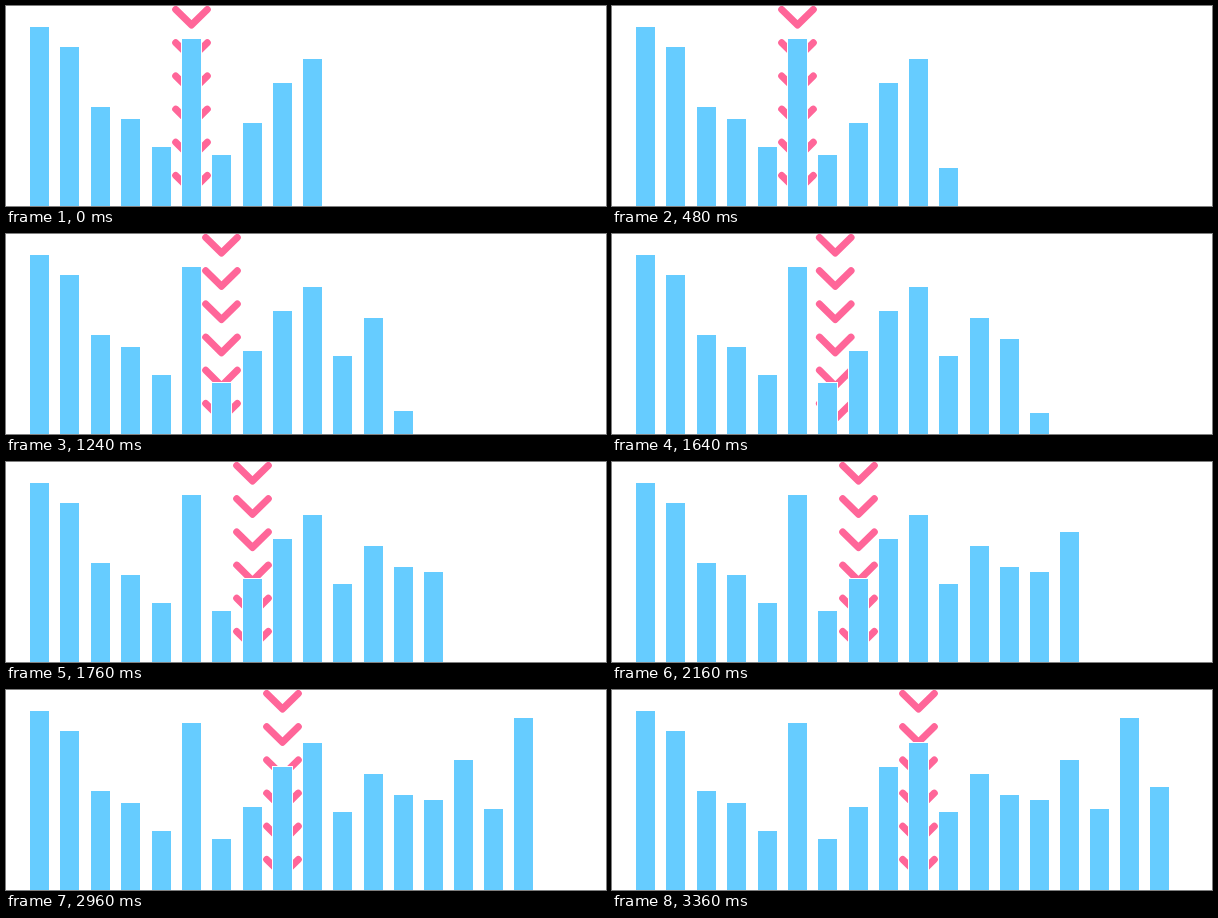
An HTML page with a canvas that plays this animation: 600x200 px, repeating every 3.84 s.

```html
<!DOCTYPE html>
<html lang="en">
<head>
<meta charset="utf-8">
<title>Bars and median marker</title>
<style>
  html, body { margin: 0; height: 100%; overflow: hidden; background: #fff; }
  canvas { display: block; }
</style>
</head>
<body>
<canvas width="600" height="200"></canvas>
<script>
const ctx = document.querySelector('canvas').getContext('2d');
const LOOP = 3840, TICK = 40, W = 600, H = 200, BAR = 19, FIRST = 10;
const values = [179, 159, 99, 87, 59, 167, 51, 83, 123, 147, 78, 116, 95, 90, 130, 81, 172, 103];

// Left edge of bar i; the spacing narrows slightly to the right.
const barX = i => 24 + Math.round(30.5 * i - 0.0155 * i * i);

// Linear progress in four held ticks, beginning at `start`.
const progress = (t, start) =>
  Math.max(0, Math.min(4, Math.floor((t - start) / TICK) + 1)) / 4;

function drawMarker(t) {
  let cx = barX(5) + BAR / 2;
  for (let j = 0; j < 4; j++) cx += (barX(j + 6) - barX(j + 5)) * progress(t, 840 + 800 * j);

  ctx.strokeStyle = '#ff6699';
  ctx.lineWidth = 7;
  ctx.lineCap = ctx.lineJoin = 'round';
  for (let y = 3.5; y < H; y += 33.2) {
    ctx.beginPath();
    ctx.moveTo(cx - 15.8, y);
    ctx.lineTo(cx, y + 15.6);
    ctx.lineTo(cx + 15.8, y);
    ctx.stroke();
  }
}

function drawBar(value, i, t) {
  const p = i < FIRST ? 1 : progress(t, 440 + 400 * (i - FIRST));
  if (!p) return;
  const x = barX(i), base = H + 2; // bars rise from just below the stage
  const y = Math.floor(base - (value + 2) * p);
  ctx.fillStyle = '#fff';
  ctx.fillRect(x - 1, y - 1, BAR + 2, H - y + 1);
  ctx.fillStyle = '#66ccff';
  ctx.fillRect(x, y, BAR, H - y);
}

const t0 = performance.now();
function frame() {
  const t = (performance.now() - t0) % LOOP;
  ctx.fillStyle = '#fff';
  ctx.fillRect(0, 0, W, H);
  drawMarker(t);
  values.forEach((value, i) => drawBar(value, i, t));
  requestAnimationFrame(frame);
}
frame();
</script>
</body>
</html>
```
